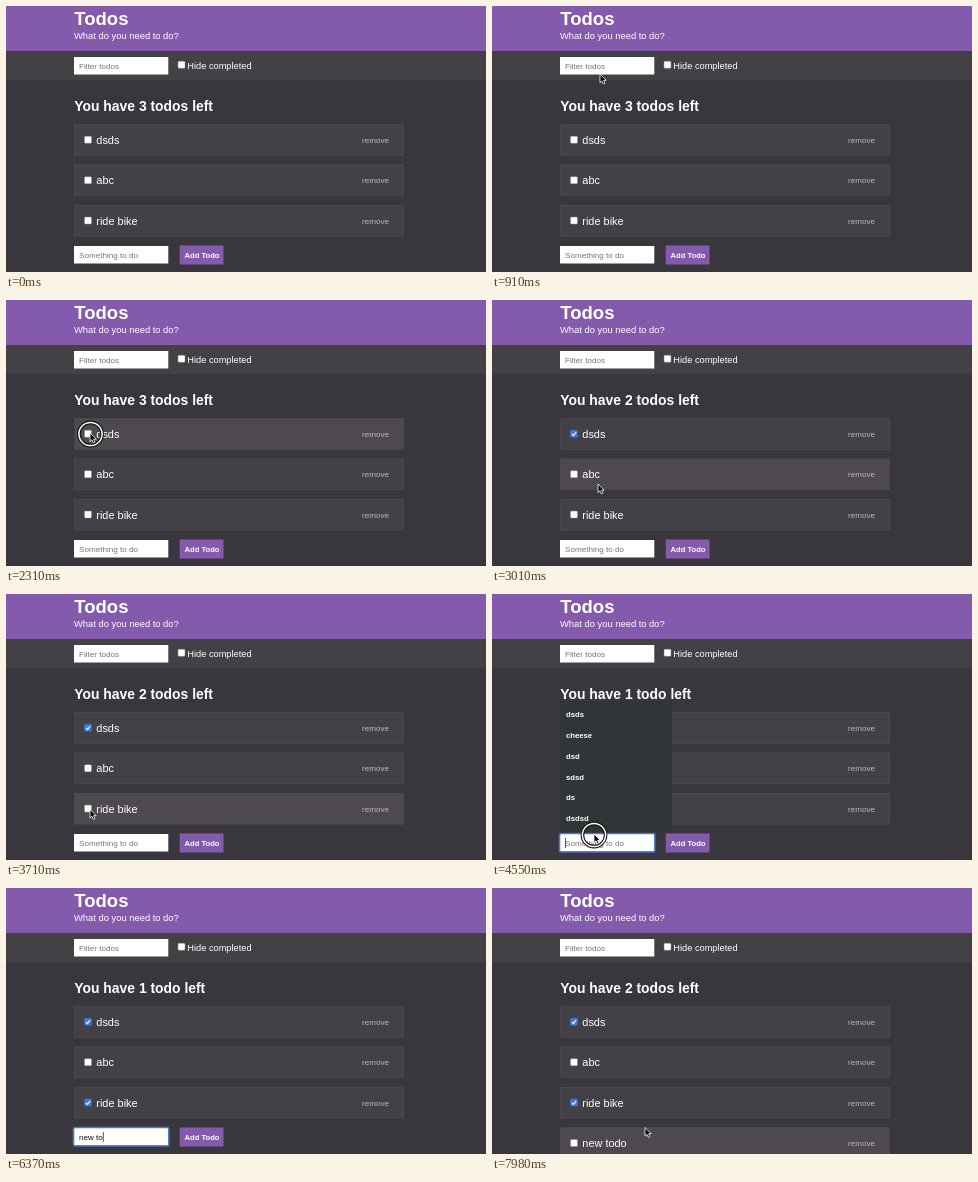
Animation, 480 px wide and 266 px high, one loop 8 s. Source, as an HTML page:

```html
<!DOCTYPE html>
<html lang="en">
<head>
<meta charset="utf-8">
<title>Todos</title>
<style>
  html, body { margin: 0; width: 100%; height: 100%; overflow: hidden; background: #3a363d; }
  svg { display: block; width: 480px; height: 266px; font-family: "Liberation Sans", Arial, sans-serif; }
  text { white-space: pre; }
</style>
</head>
<body>
<svg id="stage" viewBox="0 0 480 266"></svg>
<script>
const LOOP = 8000;
const PURPLE = '#845aad', PANEL = '#434046', HOVER = '#4d494f', GREY = '#757575';
const stage = document.getElementById('stage');

// Pointer path: time, x, y
const path = [
  [560, 98, 22], [910, 108, 68], [1330, 106, 134], [1470, 124, 151], [1610, 123, 150],
  [2100, 84, 133], [2590, 84, 133], [3010, 106, 184], [3150, 106, 188], [3640, 84, 215.5],
  [3920, 84, 215.5], [4270, 102, 240], [7770, 102, 240], [7980, 153, 239.5]
];
const clicks = [[2310, 2450, 84.5, 134], [3780, 3920, 84.5, 215], [4410, 4830, 102, 241]];
const keys = [[5530, 'n'], [5810, 'ne'], [6020, 'new'], [6160, 'new '], [6370, 'new to'], [6510, 'new tod'], [6650, 'new todo']];
const FOCUS = 4410, ENTER = 6860;

const within = (t, a, b) => t >= a && t < b;
const rect = (x, y, w, h, fill, extra = '') =>
  `<rect x="${x}" y="${y}" width="${w}" height="${h}" fill="${fill}" ${extra}/>`;
const text = (x, y, size, str, fill = '#fff', weight = 400) =>
  `<text x="${x}" y="${y}" font-size="${size}" fill="${fill}" font-weight="${weight}">${str}</text>`;

function pointerAt(t) {
  if (t < path[0][0]) return null;
  const i = path.findIndex(p => p[0] > t);
  if (i < 0) return path[path.length - 1].slice(1);
  const [t0, x0, y0] = path[i - 1], [t1, x1, y1] = path[i];
  const u = (t - t0) / (t1 - t0);
  return [x0 + (x1 - x0) * u, y0 + (y1 - y0) * u];
}

function checkbox(x, y, on) {
  const box = rect(x, y, 7, 7, on ? '#3b78e7' : '#fff', `rx="1" stroke="${on ? '#3b78e7' : '#8a888c'}" stroke-width=".5"`);
  return box + (on ? `<path d="M${x + 1.5} ${y + 3.7}l1.5 1.6 2.7-3.6" fill="none" stroke="#fff" stroke-width="1.1"/>` : '');
}

function row(label, i, done, pointer) {
  const y = 118 + i * 40.4;
  const hot = pointer && pointer[0] > 68 && pointer[0] < 398 && pointer[1] >= y && pointer[1] < y + 31.5;
  return rect(68.5, y + .5, 329, 30.8, hot ? HOVER : PANEL, 'stroke="#504c53" stroke-width=".7"')
    + checkbox(78.5, y + 12.3, done)
    + text(90.3, y + 19.8, 10.95, label)
    + text(356, y + 18.7, 8.1, 'remove', '#bcbabd');
}

function form(t) {
  const focused = t >= FOCUS;
  const typed = keys.filter(k => k[0] <= t).pop();
  const value = typed ? typed[1] : '';
  let out = rect(68, 240, 94.3, 17.5, '#fff');
  if (focused) out += rect(67.5, 239.5, 95.3, 18.5, 'none', 'rx="1.5" stroke="#4a78d0" stroke-width="1.6"');
  out += value ? text(73, 251.6, 8.1, value, '#111') : text(73, 251.6, 8.1, 'Something to do', GREY);
  if (focused && (t - (typed ? typed[0] : 4500)) % 1000 < 500) {
    const widths = { n: .556, e: .556, w: .722, ' ': .278, t: .278, o: .556, d: .556 };
    const end = [...value].reduce((x, c) => x + widths[c] * 8.1, 73);
    out += rect(end, 244, .7, 10, '#111');
  }
  return out + rect(173.7, 239.5, 43.8, 19, PURPLE) + text(178.6, 251.6, 7.6, 'Add Todo', '#fff', 700);
}

function suggestions() {
  const words = ['dsds', 'cheese', 'dsd', 'sdsd', 'ds', 'dsdsd'];
  return rect(68, 107, 112, 131.5, '#303638')
    + words.map((w, i) => text(74, 123.2 + i * 20.8, 7.7, w, '#fff', 700)).join('');
}

function ring(x, y) {
  const circle = (color, width) => `<circle cx="${x}" cy="${y}" r="11.6" fill="none" stroke="${color}" stroke-width="${width}"/>`;
  return circle('#111', 3.6) + circle('#fff', 1.5);
}

const arrow = ([x, y]) => `<path transform="translate(${x} ${y})" d="M0 0V8.6L2 6.8 3.3 9.8 4.9 9.1 3.6 6.2H6.2Z"
  fill="#000" stroke="#fff" stroke-width=".8"/>`;

function render(t) {
  const pointer = pointerAt(t), added = t >= ENTER;
  const done = [t >= 2450, false, t >= 3920, false];
  const labels = ['dsds', 'abc', 'ride bike'].concat(added ? 'new todo' : []);
  const left = labels.filter((_, i) => !done[i]).length;
  const listOpen = within(t, FOCUS, 5530);
  const click = clicks.find(c => within(t, c[0], c[1]));
  const hidden = within(t, 5530, 7770);

  stage.innerHTML = rect(0, 0, 480, 266, '#3a363d')
    + rect(0, 0, 480, 45, PURPLE)
    + rect(0, 45, 480, 29, PANEL)
    + text(68.3, 19.4, 18.5, 'Todos', '#fff', 700)
    + text(68, 33.4, 9.4, 'What do you need to do?')
    + rect(68, 51, 94.3, 17.5, '#fff')
    + text(73, 62.6, 8.1, 'Filter todos', GREY)
    + checkbox(172, 55.3, false)
    + text(181.3, 62.6, 9.25, 'Hide completed')
    + text(68.3, 105.2, 13.9, `You have ${left} todo${left === 1 ? '' : 's'} left`, '#fff', 700)
    + labels.map((label, i) => row(label, i, done[i], listOpen ? null : pointer)).join('')
    + (added ? '' : form(t))
    + (listOpen ? suggestions() : '')
    + (click ? ring(click[2], click[3]) : '')
    + (pointer && !hidden ? arrow(pointer) : '');
}

const start = performance.now();
function tick() {
  render((performance.now() - start) % LOOP);
  requestAnimationFrame(tick);
}
tick();
</script>
</body>
</html>
```
